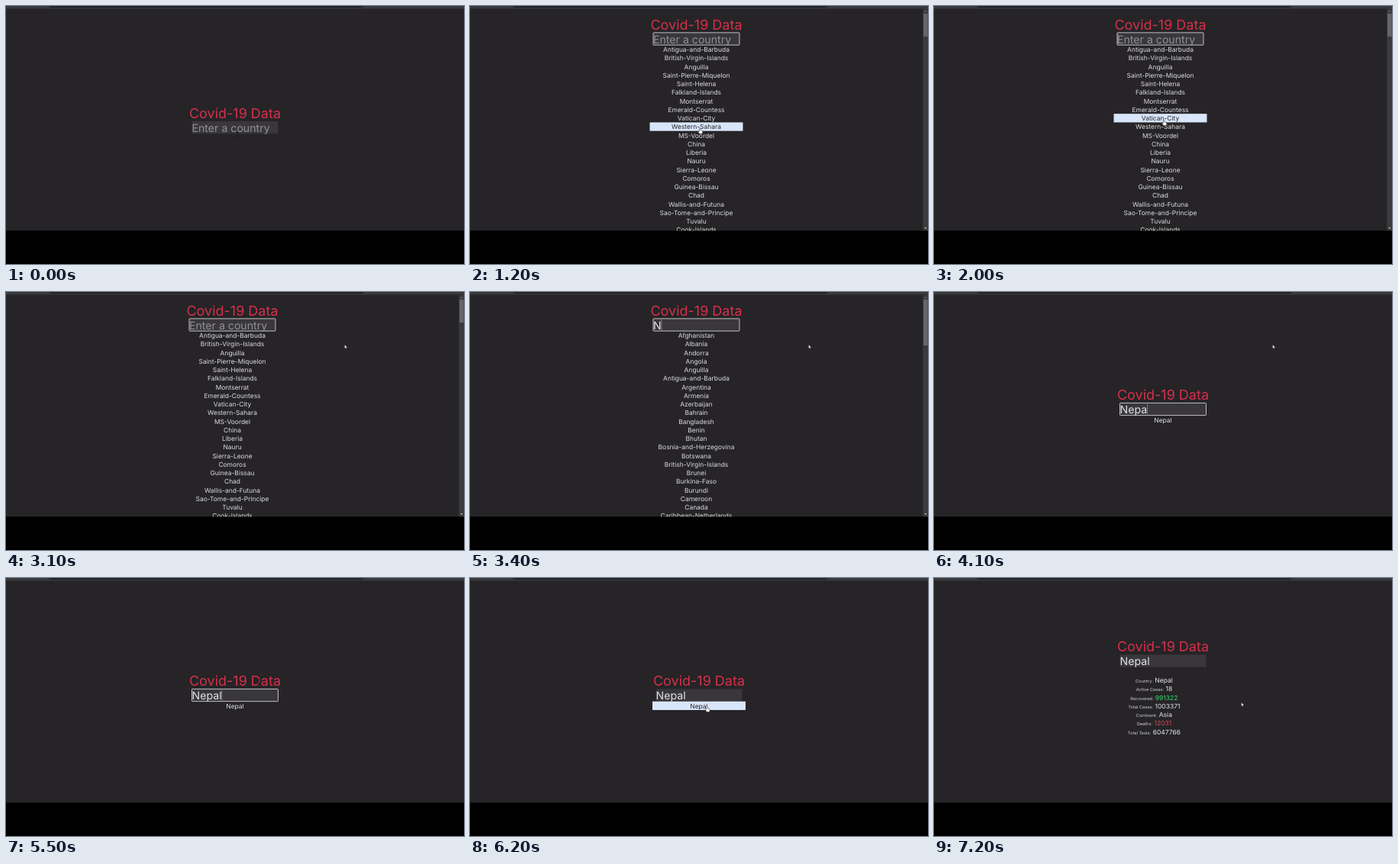
Animation, 600 px wide and 338 px high, one loop 7.3 s. Source, as an HTML page:

```html
<!DOCTYPE html>
<html lang="en">
<head>
<meta charset="utf-8">
<title>Covid-19 Data</title>
<style>
  html, body { margin: 0; width: 100%; height: 100%; overflow: hidden; background: #000; }
  svg { display: block; width: 100%; height: 100%; }
  text { font-family: Inter, Roboto, sans-serif; text-rendering: geometricPrecision; white-space: pre; }
  .title { font-size: 18px; fill: #d6304a; text-anchor: middle; }
  .field { font-size: 14.15px; fill: #e4e4e5; }
  .field.hint { fill: #929194; }
  .row { font-size: 8.45px; fill: #dcdcdd; text-anchor: middle; }
  .row.hot { fill: #26262b; }
  .fact { font-size: 8.5px; fill: #e6e6e7; text-anchor: middle; }
  .fact .label { font-size: 5.65px; fill: #cfcfd0; }
</style>
</head>
<body>
<svg viewBox="0 0 600 338">
  <rect width="600" height="294.5" fill="#262427"/>
  <g id="page"></g>
  <rect y="294.5" width="600" height="44"/>
  <rect width="600" height="3.6" fill="#38393c"/>
  <path d="M56 0H469Q468 2.2 464 2.2H61Q57 2.2 56 0Z" fill="#222427"/>
  <g id="pointer"></g>
</svg>
<script>
const LOOP = 7300, PITCH = 11.25, FIELD_W = 113, FIELD_H = 16.6;

const names = text => text.split(' ');
const LISTS = {
  all: names('Antigua-and-Barbuda British-Virgin-Islands Anguilla Saint-Pierre-Miquelon Saint-Helena ' +
    'Falkland-Islands Montserrat Emerald-Countess Vatican-City Western-Sahara MS-Voordel China Liberia ' +
    'Nauru Sierra-Leone Comoros Guinea-Bissau Chad Wallis-and-Futuna Sao-Tome-and-Principe Tuvalu Cook-Islands'),
  n: names('Afghanistan Albania Andorra Angola Anguilla Antigua-and-Barbuda Argentina Armenia Azerbaijan ' +
    'Bahrain Bangladesh Benin Bhutan Bosnia-and-Herzegovina Botswana British-Virgin-Islands Brunei ' +
    'Burkina-Faso Burundi Cameroon Canada Caribbean-Netherlands'),
  ne: names('Brunei Caribbean-Netherlands Channel-Islands Equatorial-Guinea French-Polynesia Guinea ' +
    'Guinea-Bissau Indonesia Micronesia Montenegro Nepal Netherlands New-Caledonia New-Zealand Palestine ' +
    'Papua-New-Guinea Philippines Saint-Kitts-and-Nevis Senegal Sierra-Leone St-Vincent-Grenadines Ukraine'),
  nepal: ['Nepal'],
  none: []
};
const FACTS = [
  ['Country', 'Nepal'], ['Active Cases', '18'], ['Recovered', '991322', '#35dc68'],
  ['Total Cases', '1003371'], ['Continent', 'Asia'], ['Deaths', '12031', '#e2465c'],
  ['Total Tests', '6047766']
];

// Each step overrides part of the state before it.
const STEPS = [
  [0, { top: 150.7, center: 300, typed: '', list: 'none', hot: -1, thumb: 0, focus: false,
        caret: false, facts: false, cursor: ['beam', 303.3, 168.5] }],
  [1200, { top: 34.6, center: 296.5, list: 'all', hot: 9, thumb: 30, focus: true, cursor: ['hand', 301, 159.5] }],
  [1900, { caret: true, hot: 8, cursor: ['hand', 301, 151] }],
  [2000, { cursor: ['hand', 301, 148.5] }],
  [2200, { hot: -1, cursor: ['arrow', 443.6, 69] }],
  [2700, { caret: false }],
  [3200, { typed: 'N', list: 'n', thumb: 60, caret: true }],
  [3700, { typed: 'Ne', list: 'ne', thumb: 255 }],
  [3900, { typed: 'Nep', list: 'nepal', thumb: 0, top: 145.1, center: 300 }],
  [4100, { typed: 'Nepa' }],
  [4200, { typed: 'Nepal' }],
  [4700, { caret: false }],
  [5200, { caret: true }],
  [5300, { cursor: ['arrow', 412, 92] }],
  [5400, { cursor: ['arrow', 362, 120] }],
  [5500, { cursor: ['beam', 331, 136] }],
  [5700, { caret: false, hot: 0, cursor: ['hand', 313, 166] }],
  [5800, { cursor: ['hand', 310.5, 167.5] }],
  [6000, { focus: false }],
  [6300, { top: 100.1, list: 'none', hot: -1, facts: true, cursor: ['beam', 310.5, 167.5] }],
  [6800, { cursor: ['arrow', 402.6, 163] }]
];
let last = {};
const states = STEPS.map(([time, change]) => last = { ...last, ...change, time });

const CURSORS = {
  arrow: '<path d="M0 0V5.2L1.2 4.1L2 5.8L2.7 5.5L2 3.8H3.6Z" fill="#fff" stroke="#111" stroke-width=".4"/>',
  hand: '<path d="M-.7 .6Q0-.6 .7 .6V3.2L3.4 4Q4 4.3 3.8 5.3L3.1 8H-.5L-2.3 5.1Q-2.2 4.2-.7 5Z" ' +
        'fill="#fff" stroke="#222" stroke-width=".5"/>',
  beam: '<path d="M-1-3H1M0-3V3M-1 3H1" fill="none" stroke="#0d0c0e" stroke-width=".7"/>'
};

const box = (x, y, w, h, fill, extra = '') =>
  `<rect x="${x}" y="${y}" width="${w}" height="${h}" fill="${fill}" ${extra}/>`;
const label = (cls, x, y, content) => `<text class="${cls}" x="${x}" y="${y}">${content}</text>`;

function scrollbar(thumb) {
  return box(593.3, 3.6, 6.7, 291, '#3b3a3c') + box(594, 10, 5.6, thumb, '#676668') +
    '<path d="M595.3 8L596.8 6L598.3 8Z" fill="#6f6e70"/>' +
    '<path d="M595.3 290L598.3 290L596.8 292Z" fill="#c8c8c9"/>';
}

function drawPage(s) {
  const left = s.center - FIELD_W / 2, listTop = s.top + FIELD_H;
  const edge = s.focus ? 'stroke="#d2d2d4" stroke-width=".9" rx=".8"' : '';
  let out = label('title', s.center, s.top - 4, 'Covid-19 Data');
  out += box(left, s.top + .3, FIELD_W, FIELD_H - .4, '#39373b', edge);
  out += label(s.typed ? 'field' : 'field hint', left, s.top + 13.9, s.typed || 'Enter a country');
  LISTS[s.list].forEach((name, i) => {
    const y = listTop + i * PITCH, hot = i === s.hot;
    if (hot) out += box(s.center - 61, y, 122, PITCH, '#d9e6fa');
    out += label(hot ? 'row hot' : 'row', s.center, y + 8.85, name);
  });
  if (s.facts) FACTS.forEach(([key, value, color = '#e6e6e7'], i) => {
    out += label('fact', 288.4, s.top + 37.1 + i * PITCH,
      `<tspan class="label">${key}:</tspan><tspan fill="${color}"> ${value}</tspan>`);
  });
  if (s.thumb) out += scrollbar(s.thumb);
  page.innerHTML = out;
  if (s.caret) {
    const width = s.typed ? page.querySelector('.field').getComputedTextLength() : .5;
    page.insertAdjacentHTML('beforeend', box(left + width, s.top + 1.5, .6, 13.8, '#b9a5a8'));
  }
}

function drawPointer([kind, x, y]) {
  pointer.innerHTML = `<g transform="translate(${x} ${y})">${CURSORS[kind]}</g>`;
}

const page = document.getElementById('page'), pointer = document.getElementById('pointer');
const start = performance.now();
let shown = null;

function tick() {
  const time = (performance.now() - start) % LOOP;
  const state = states.findLast(s => s.time <= time) || states[0];
  if (state !== shown) {
    drawPage(state);
    drawPointer(state.cursor);
    shown = state;
  }
  requestAnimationFrame(tick);
}
tick();
</script>
</body>
</html>
```
